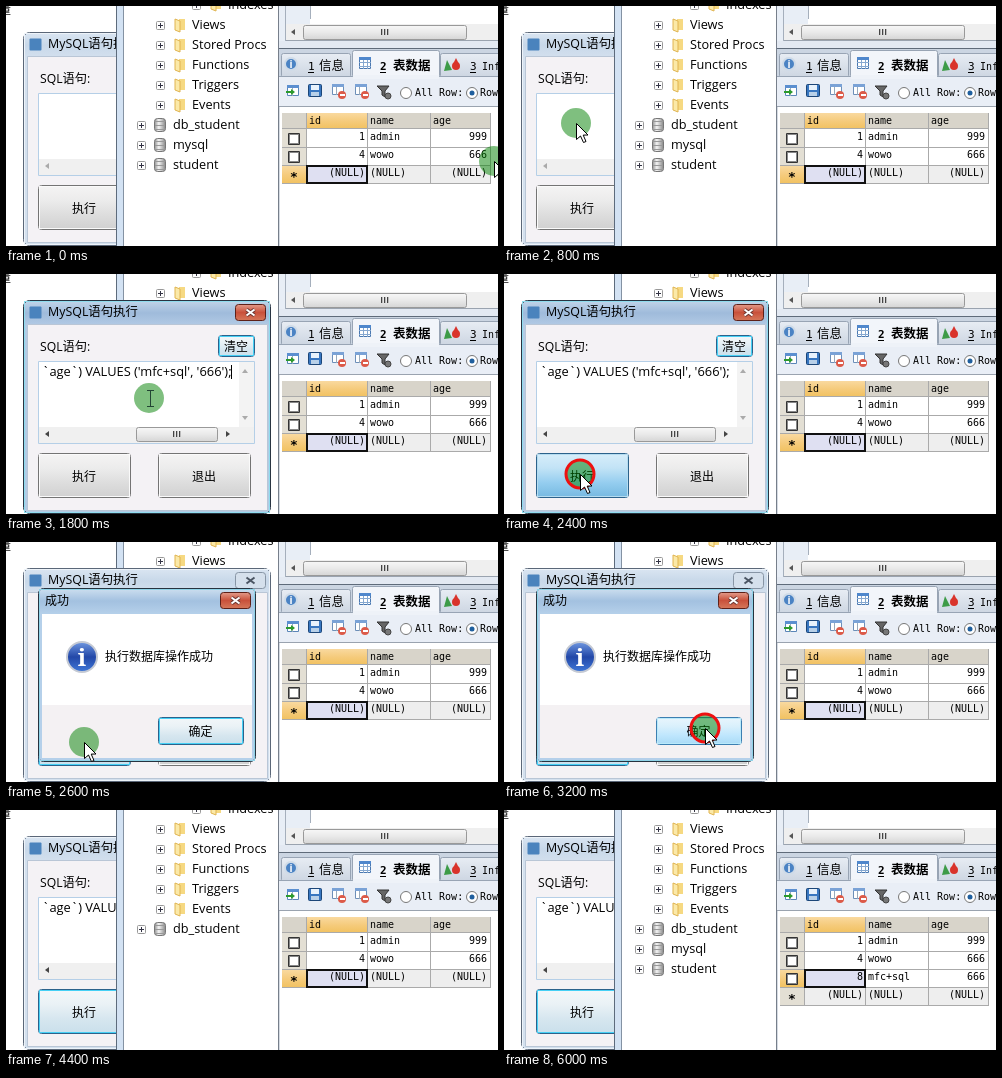
An HTML page with a canvas for the animation above (8000 ms loop, 492 by 240 pixels).

```html
<!DOCTYPE html>
<html lang="zh">
<head>
<meta charset="utf-8">
<title>MySQL语句执行</title>
<style>
html, body { margin: 0; width: 100%; height: 100%; overflow: hidden; background: #fff; }
canvas { display: block; width: 492px; height: 240px; }
</style>
</head>
<body>
<canvas id="stage" width="492" height="240"></canvas>
<script>
const ctx = document.getElementById('stage').getContext('2d');
const LOOP = 8000, STEP = 200;
const UI = '"Open Sans", "Noto Sans CJK SC", "Noto Sans CJK", sans-serif';
const MONO = '"DejaVu Sans Mono", "Noto Sans CJK SC", "Noto Sans CJK", monospace';

// Pointer keys: time, x, y, kind (a = arrow, c = click, i = text beam, '' = hidden)
const POINTER = [
  [0, 488, 155, 'a'], [200, 430, 150, 'a'], [400, 245, 136, 'a'], [600, 110, 121, 'a'],
  [800, 72, 117, 'a'], [1000, 72, 117, 'c'], [1200, 74, 117, 'i'], [1400, 92, 119, 'i'],
  [1600, 130, 123, 'i'], [1800, 143, 124, 'i'], [2000, 122, 148, 'i'], [2200, 84, 190, 'a'],
  [2400, 76, 200, 'c'], [2600, 78, 200, 'a'], [2800, 128, 195, 'a'], [3000, 190, 188, 'a'],
  [3200, 201, 186, 'c'], [3400, 212, 192, 'a'], [3600, 361, 228, 'a'], [3800, 350, 236, 'a'],
  [4000, 0, 0, '']
];

function grad(y, h, ...colors) {
  const g = ctx.createLinearGradient(0, y, 0, y + h);
  colors.forEach((c, i) => g.addColorStop(i / (colors.length - 1), c));
  return g;
}
function fill(x, y, w, h, color) {
  ctx.fillStyle = color;
  ctx.fillRect(x, y, w, h);
}
function box(x, y, w, h, color, edge, r = 0) {
  ctx.beginPath();
  ctx.roundRect(x + 0.5, y + 0.5, w - 1, h - 1, r);
  ctx.fillStyle = color;
  ctx.fill();
  if (edge) {
    ctx.strokeStyle = edge;
    ctx.lineWidth = 1;
    ctx.stroke();
  }
}
function frame(x, y, w, h, color) {
  ctx.strokeStyle = color;
  ctx.lineWidth = 1;
  ctx.strokeRect(x + 0.5, y + 0.5, w - 1, h - 1);
}
function disc(x, y, r, color, edge, width = 1) {
  ctx.beginPath();
  ctx.arc(x, y, r, 0, Math.PI * 2);
  if (color) { ctx.fillStyle = color; ctx.fill(); }
  if (edge) { ctx.strokeStyle = edge; ctx.lineWidth = width; ctx.stroke(); }
}
function poly(points, color, edge) {
  ctx.beginPath();
  points.forEach(([x, y]) => ctx.lineTo(x, y));
  ctx.closePath();
  ctx.fillStyle = color;
  ctx.fill();
  if (edge) { ctx.strokeStyle = edge; ctx.lineWidth = 1; ctx.stroke(); }
}
function line(x1, y1, x2, y2, color, width = 1) {
  ctx.beginPath();
  ctx.moveTo(x1, y1);
  ctx.lineTo(x2, y2);
  ctx.strokeStyle = color;
  ctx.lineWidth = width;
  ctx.stroke();
}
function text(s, x, y, font, color = '#000', align = 'left') {
  ctx.font = font;
  ctx.fillStyle = color;
  ctx.textAlign = align;
  ctx.fillText(s, x, y);
}
const ui = (s, x, y, size = 12, align) => text(s, x, y, `${size}px ${UI}`, '#000', align);
const mono = (s, x, y, align) => text(s, x, y, `10px ${MONO}`, '#000', align);

// Small arrowhead pointing along dx, dy
function head(x, y, dx, dy, color) {
  poly([[x + dx * 2, y + dy * 2], [x - dx * 2 + dy * 3, y - dy * 2 + dx * 3],
        [x - dx * 2 - dy * 3, y - dy * 2 - dx * 3]], color);
}
function thumb(x, y, w) {
  box(x, y, w, 15, grad(y, 15, '#f8f8f8', '#e9e9e9', '#d4d4d4'), '#999', 2);
  const mid = x + Math.floor(w / 2);
  for (const dx of [-4, -1, 2]) {
    fill(mid + dx, y + 4, 1, 6, '#444');
    fill(mid + dx + 1, y + 4, 1, 6, '#bbb');
  }
}

function folder(x, y) {
  poly([[x + 4, y - 6], [x + 10, y - 6], [x + 10, y + 5], [x + 4, y + 5]], '#f6d982');
  poly([[x, y - 6], [x + 5, y - 4], [x + 5, y + 7], [x, y + 5]], '#fbe9a8', '#e0b450');
}
function cylinder(x, y) {
  const g = ctx.createLinearGradient(x, 0, x + 12, 0);
  g.addColorStop(0, '#888'); g.addColorStop(0.4, '#f4f4f4'); g.addColorStop(1, '#808080');
  box(x, y - 7, 12, 14, g, '#777', 3);
  for (const dy of [-3.5, 0.5, 4.5]) line(x + 1, y + dy, x + 11, y + dy, '#999');
}
function expander(x, y) {
  box(x, y - 4, 9, 9, '#fdfdfd', '#999', 1);
  fill(x + 2, y, 5, 1, '#334');
  fill(x + 4, y - 2, 1, 5, '#334');
}

function drawTree(rows) {
  fill(110, 0, 163, 240, '#fff');
  fill(110, 0, 1, 240, '#5d6b7c');
  fill(111, 0, 6, 240, '#d3e2f3');
  fill(117, 0, 1, 240, '#8492a3');
  expander(186, -1);
  folder(205, -2);
  ui('Indexes', 222, 3, 12.7);
  const groups = ['Views', 'Stored Procs', 'Functions', 'Triggers', 'Events'];
  const bases = ['db_student', 'mysql', 'student'];
  groups.concat(bases).slice(0, rows).forEach((name, i) => {
    const y = 19 + i * 20, base = i >= groups.length;
    expander(base ? 131 : 150, y);
    if (base) cylinder(148, y); else folder(169, y);
    ui(name, base ? 167 : 186, y + 4, 12.7);
  });
}

function drawIcons() {
  // export, save, delete, cancel, filter
  box(281, 79, 12, 11, '#fff', '#5a86b8');
  fill(281, 79, 12, 3, '#5b8fd0');
  fill(286, 82, 1, 8, '#9ab');
  line(280, 86, 285, 86, '#2c9a2c', 2);
  head(287, 86, 1, 0, '#2c9a2c');
  box(302, 78, 14, 13, '#3876c0', '#1c4678', 1);
  fill(305, 79, 8, 5, '#e8f2fc');
  fill(305, 86, 8, 4, '#b8d0e8');
  for (const x of [326, 349]) {
    box(x, 78, 12, 11, '#fff', '#6d8fb8');
    fill(x, 78, 12, 3, '#7aa2d6');
    fill(x + 4, 81, 1, 8, '#9ab');
    disc(x + 10, 89, 4, '#dc5a48');
    fill(x + 8, 88, 5, 2, '#fff');
  }
  poly([[371, 80], [383, 80], [379, 85], [379, 91], [376, 89], [376, 85]], '#666', '#333');
  disc(382, 90, 3, '#777', '#444');
}

function radio(x, on) {
  disc(x, 87, 5.5, '#fff', '#777');
  if (on) disc(x, 87, 2.5, '#1f5f9e');
}

const headerGold = (y, h) => grad(y, h, '#f9d99f', '#f5cb7c', '#f1c15f');

function cell(x, y, w, h, color) {
  fill(x, y, w, h, color);
  fill(x, y + h - 1, w, 1, '#aaa');
  fill(x + w - 1, y, 1, h, '#aaa');
}
function drawGrid(added) {
  const xs = [276, 301, 362, 425, 485];
  ['', 'id', 'name', 'age'].forEach((name, i) => {
    cell(xs[i], 107, xs[i + 1] - xs[i], 16, i === 1 ? headerGold(107, 16) : '#d8d4ca');
    mono(name, xs[i] + 2, 118);
  });
  const rows = [['1', 'admin', '999'], ['4', 'wowo', '666']];
  if (added) rows.push(['8', 'mfc+sql', '666']);
  rows.push(['(NULL)', '(NULL)', '(NULL)']);
  rows.forEach((row, r) => {
    const y = 123 + r * 18 + (r ? 1 : 0), h = r ? 18 : 19, base = 134 + r * 18;
    const active = r === 2, last = r === rows.length - 1;
    cell(276, y, 25, h, active ? headerGold(y, h) : '#e3dfd4');
    for (let i = 1; i < 4; i++) {
      cell(xs[i], y, xs[i + 1] - xs[i], h, active && i === 1 ? '#dfe0f2' : last ? '#eeeeee' : '#fff');
    }
    if (last) text('*', 288, base + 5, `bold 13px ${MONO}`, '#000', 'center');
    else {
      box(282, base - 7, 12, 12, '#fff', '#333');
      frame(283, base - 6, 10, 10, '#888');
    }
    mono(row[0], 359, base, 'right');
    mono(row[1], 364, base);
    mono(row[2], 481, base, 'right');
    if (active) {
      ctx.strokeStyle = '#111';
      ctx.lineWidth = 2;
      ctx.strokeRect(301, y, 60, h - 1);
    }
  });
}

function tabLabel(key, name, x, gap, style) {
  text(key, x, 64, `${style} 11px ${MONO}`);
  fill(x, 66, 6, 1, '#000');
  text(name, x + gap, 64, `${style} ${MONO}`.replace(`${style} `, `${style} 12.5px `));
}

function drawTable(t) {
  fill(272, 0, 220, 240, '#fff');
  fill(272, 0, 8, 42, '#e8eef6');
  fill(272, 0, 1, 240, '#777f8b');
  fill(279, 0, 1, 35, '#a5afbc');
  fill(280, 0, 24, 18, '#e8eef6');
  fill(304, 0, 1, 13, '#a5afbc');
  fill(280, 18, 212, 16, '#efefef');
  head(287, 26, -1, 0, '#555');
  thumb(297, 19, 164);
  fill(280, 34, 212, 1, '#9aa3af');
  fill(273, 35, 219, 7, '#e3e9f2');
  fill(273, 42, 219, 1, '#5f6b7a');
  fill(273, 43, 219, 28, '#cbd5e2');
  for (const x of [275, 434]) box(x, 47, 70, 25, grad(47, 25, '#e8edf4', '#ccd5e1'), '#98a4b4', 2);
  fill(273, 71, 219, 30, '#e9eef6');
  fill(273, 70, 219, 1, '#98a4b4');
  box(346, 44, 88, 28, '#f2f5fa', '#98a4b4', 2);
  fill(347, 69, 86, 4, '#eef2f8');

  disc(285, 58, 6, '#4b83c4', '#cfdbe8', 2);
  text('i', 285, 62, `bold 10px ${UI}`, '#fff', 'center');
  box(353, 51, 12, 12, '#fff', '#4a78b0');
  fill(353, 51, 12, 3, '#4f87cc');
  for (const d of [4, 8]) {
    fill(353 + d, 54, 1, 9, '#86a8d0');
    fill(353, 52 + d, 12, 1, '#86a8d0');
  }
  poly([[438, 65], [441, 54], [446, 64]], '#3d9b47');
  disc(450, 60, 4, '#d9332b');
  poly([[447, 58], [450, 52], [453, 58]], '#d9332b');
  tabLabel('1', '信息', 302, 11, 'normal');
  tabLabel('2', '表数据', 374, 13, 'bold');
  tabLabel('3', '', 464, 0, 'normal');
  mono('Info', 476, 64);

  drawIcons();
  radio(400, false);
  mono('All Row:', 409, 90);
  radio(466, true);
  mono('Rows', 474, 90);
  fill(273, 100, 219, 1, '#9aa3af');
  fill(273, 101, 1, 139, '#d5dbe3');
  if (t < 5800 || t >= 6000) drawGrid(t >= 6000);
}

function closeButton(x, y, active) {
  const w = 31, h = 17, cx = x + w / 2, cy = y + h / 2;
  box(x, y, w, h, active ? grad(y, h, '#e5a08f', '#c9513b', '#d67a5c') : '#d5e0ec', active ? '#5d2018' : '#8795a5', 3);
  for (const [width, color] of active ? [[4, '#6b3530'], [2, '#fff']] : [[2, '#4b5563']]) {
    line(cx - 4, cy - 3, cx + 4, cy + 3, color, width);
    line(cx - 4, cy + 3, cx + 4, cy - 3, color, width);
  }
}

const BUTTONS = {
  plain: { fills: ['#f5f4f4', '#ececec', '#dddddd', '#d0d0d0'], edge: '#747474', inner: '#fafafa' },
  focus: { fills: ['#f3f7f9', '#eaf2f6', '#d6e6ef', '#c9dfeb'], edge: '#2c628b', inner: '#46d0f5' },
  hot: { fills: ['#eaf6fd', '#d9f0fc', '#bee6fd', '#a7d9f5'], edge: '#3c7fb1', inner: '#b9eafb' },
  down: { fills: ['#d8eefa', '#c2e3f6', '#94cdef', '#75b8e0'], edge: '#2c628b', inner: '#b5dcf0' }
};
function button(x, y, w, h, label, mode) {
  const { fills, edge, inner } = BUTTONS[mode];
  box(x, y, w, h, grad(y, h, ...fills), edge, 3);
  frame(x + 1, y + 1, w - 2, h - 2, inner);
  ui(label, x + w / 2 - 0.5, y + h / 2 + 5, 12, 'center');
}

function drawDialog(t, front, pasted) {
  const active = front && !(t >= 2600 && t < 3400);
  box(17, 26, 248, 214, active ? grad(26, 26, '#c3d6ea', '#9fbbdb', '#b3cbe5') : grad(26, 26, '#dbe6f2', '#c8d8e9', '#d3e0ee'),
    active ? '#293442' : '#5b6778', 6);
  frame(18, 27, 246, 212, active ? '#8fdcee' : '#edf3f9');
  box(21, 50, 241, 187, '#f4f2f5', '#b9c6d6');
  box(23, 32, 13, 13, '#4a83bd', null, 1);
  ui('MySQL语句执行', 42, 42, 12.4);
  closeButton(229, 30, active);

  ui('SQL语句:', 34, 77, 12.2);
  button(212, 61, 37, 22, '清空', t < 2600 ? 'focus' : 'plain');

  box(32, 87, 217, 83, '#fff', '#b5cfe7');
  fill(233, 88, 15, 65, '#f3f3f3');
  fill(33, 153, 215, 16, '#f0f0f0');
  head(239, 97, 0, -1, '#aaa');
  head(239, 144, 0, 1, '#aaa');
  head(41, 160, -1, 0, pasted ? '#444' : '#aaa');
  head(222, 160, 1, 0, pasted ? '#444' : '#aaa');
  if (pasted) {
    thumb(130, 153, 82);
    ui("`age`) VALUES ('mfc+sql', '666');", 36, 102, 12.85);
    if (t < 2200) fill(225, 91, 1, 14, '#000');
  } else if (t >= 1200) fill(36, 91, 1, 14, '#000');

  const runMode = t < 2200 ? 'plain' : t < 2400 ? 'hot' : t < 2600 ? 'down' : 'focus';
  button(32, 179, 93, 45, '执行', runMode);
  button(152, 179, 93, 45, '退出', 'plain');
}

function drawMessage(t) {
  box(32, 46, 218, 174, grad(46, 26, '#cfe0f0', '#a3c1e0', '#b5d0ea'), '#26323f', 5);
  frame(33, 47, 216, 172, '#8fd3e8');
  fill(36, 72, 210, 144, '#fff');
  fill(36, 163, 210, 53, '#f4f1f3');
  ui('成功', 39, 63);
  closeButton(214, 50, true);
  disc(76, 115, 15, grad(100, 30, '#6f97e0', '#2348a8', '#3f78d8'), '#c5cad4', 2);
  text('i', 76, 124, 'bold 24px "Noto Serif", serif', '#fff', 'center');
  ui('执行数据库操作成功', 99, 119);
  button(152, 175, 86, 28, '确定', t < 3200 ? 'focus' : 'hot');
}

function drawPointer(t) {
  const [, x, y, kind] = POINTER.filter(k => k[0] <= t).pop();
  if (!kind) return;
  disc(x, y, 15, 'rgba(0,128,0,.5)');
  if (kind === 'c') disc(x, y, 14, null, '#ee1111', 3);
  if (kind === 'i') {
    fill(x + 1, y - 7, 1, 15, '#243');
    fill(x - 2, y - 8, 7, 1, '#243');
    fill(x - 2, y + 8, 7, 1, '#243');
    return;
  }
  const shape = [[0, 0], [0, 16], [4, 12.5], [7, 19], [9.5, 18], [6.7, 11.6], [11.5, 11.5]];
  poly(shape.map(([dx, dy]) => [x + dx + 0.5, y + dy + 0.5]), '#fff', '#000');
}

function draw(t) {
  fill(0, 0, 492, 240, '#fff');
  ui('量', -7, 8);
  const front = t >= 1000 && t < 4200;
  const pasted = t >= 1600;
  const rows = t < 4200 || t >= 4600 ? 8 : t < 4400 ? 5 : 6;
  if (!front) drawDialog(t, front, pasted);
  drawTree(rows);
  drawTable(t);
  if (front) drawDialog(t, front, pasted);
  if (t >= 2600 && t < 3400) drawMessage(t);
  drawPointer(t);
}

const start = performance.now();
function tick() {
  const t = (performance.now() - start) % LOOP;
  draw(Math.floor(t / STEP) * STEP);
  requestAnimationFrame(tick);
}
tick();
</script>
</body>
</html>
```
